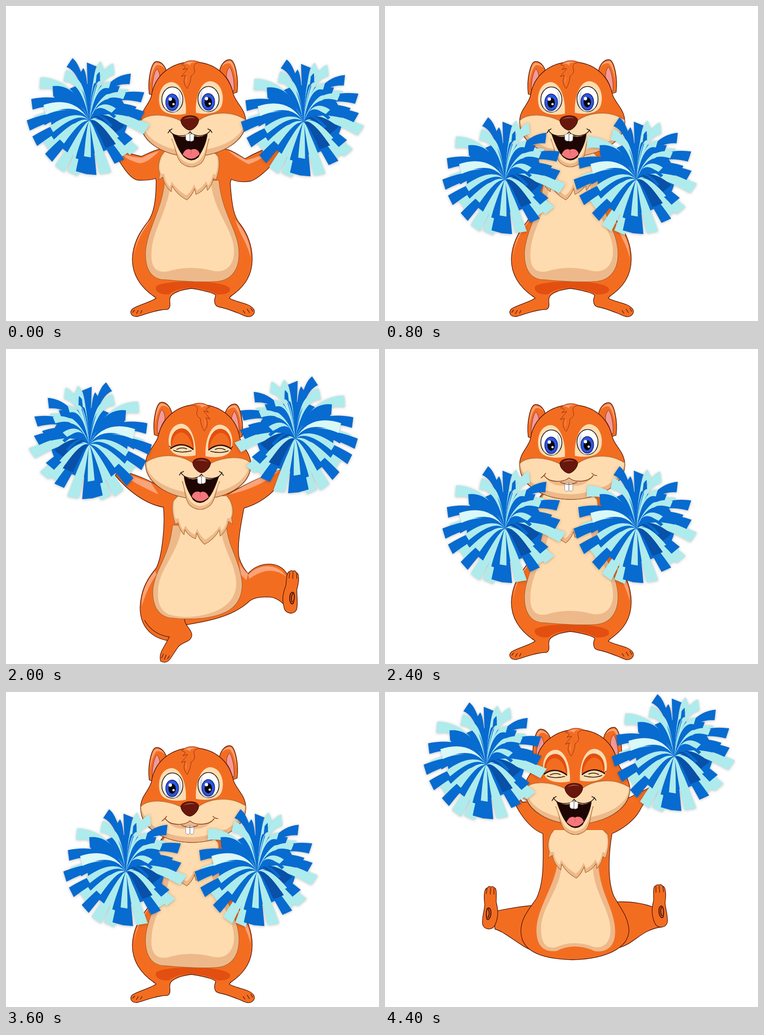
Write an HTML page that moves like this. It is 815 px wide and 687 px high and loops after 4.6 s.

```html
<!DOCTYPE html>
<html>
<head>
<meta charset="utf-8">
<title>Cheering chipmunk</title>
<style>
  html, body { margin: 0; width: 100%; height: 100%; overflow: hidden; background: #fff; }
  svg { display: block; width: 815px; height: 687px; }
  path, ellipse { stroke-linejoin: round; stroke-linecap: round; }
  .fur { fill: #f36d21; }
  .edge { stroke: #4c1507; stroke-width: 1.3; }
  .dark { fill: #e34f10; }
  .glow { fill: #fba478; }
  .cream { fill: #fedcaf; }
  .tan { fill: #eeb98a; }
  .soft { stroke: #a5642f; stroke-width: 1.2; }
  .line { fill: none; stroke: #4c1507; stroke-width: 1.3; }
  .lash { fill: none; stroke: #160805; stroke-width: 2.4; }
  .pom { filter: drop-shadow(0 1px 3px #0004); }
</style>
</head>
<body>
<svg viewBox="0 0 815 687">
  <defs>
    <g id="pom"></g>

    <g id="ear">
      <path class="fur edge" d="M313 192C309 162 317 121 329 121C341 121 350 134 352 148L324 196Z"/>
      <path class="glow" d="M315 170C315 150 320 125 329 124C336 124 344 129 347 136C340 130 333 127 328 130C321 138 317 155 315 170Z"/>
      <path d="M320 189C318 168 324 142 330 137C335 143 337 152 336 160Q327 172 324 188Z" fill="#f39a97" stroke="#8c2b16"/>
    </g>

    <g id="patch"><path class="cream" d="M338 222C329 203 336 167 362 166C384 167 395 204 393 235C375 239 346 238 338 222Z"/></g>
    <g id="eyeWhite">
      <ellipse cx="363.500" cy="204" rx="23" ry="27.500" fill="#fff" stroke="#1a0f0c" stroke-width="1.600"/>
      <path d="M376 184C387 198 388 224 369 231C357 232 349 227 346 221C368 230 381 212 376 184Z" fill="#d9dce3"/>
    </g>
    <g id="iris">
      <ellipse cx="363" cy="210" rx="14" ry="18" fill="#2f55e0" stroke="#101c60" stroke-width="1.300"/>
      <ellipse cx="363" cy="211" rx="8" ry="11" fill="#050509"/>
      <circle cx="359" cy="203" r="3.700" fill="#fff"/><circle cx="366" cy="214" r="2.500" fill="#fff"/>
    </g>
    <g id="lid">
      <path class="dark" d="M338 217C334 194 344 175 362 175C379 176 389 200 387 221Q361 204 338 217Z"/>
      <path class="fur" d="M340 214C340 196 348 184 361 184C374 186 383 204 384 216Q361 203 340 214Z"/>
      <path class="lash" d="M337 219Q361 202 386 221"/>
      <path class="lash" style="stroke-width:1.5" d="M343 223Q360 230 382 224M350 221Q361 215 372 220M339 218L334 214"/>
    </g>
    <g id="eyesOpen">
      <use href="#eyeWhite"/><use href="#eyeWhite" transform="matrix(-1 0 0 1 806 -1)"/>
      <use href="#iris"/><use href="#iris" x="79" y="-1"/>
    </g>
    <g id="eyesShut"><use href="#lid"/><use href="#lid" transform="matrix(-1 0 0 1 806 -1)"/></g>

    <g id="mouthOpen">
      <path class="tan soft" d="M362 290C371 306 370 330 384 343Q405 359 426 343C439 331 437 306 444 290Z"/>
      <path class="cream" d="M358 274C366 300 374 324 384 335Q405 352 424 335C436 322 440 300 446 274Z"/>
      <path d="M364 279Q388 292 402 279Q419 292 440 279C437 303 427 318 420 330Q405 343 389 329C377 316 371 298 364 279Z" fill="#1d0604" stroke="#3a0d06"/>
      <path d="M386 324C390 312 399 310 404 314C412 309 422 314 423 323Q406 343 386 324Z" fill="#f4777b"/>
      <path d="M404 315Q406 319 404 323" fill="none" stroke="#d4545a"/>
      <path class="lash" d="M357 270Q363 284 385 283Q398 282 402 274Q407 282 421 283Q441 282 447 270M354 277Q357 271 363 268M441 268Q448 271 450 276" style="stroke-width:1.6"/>
      <path d="M393 281Q401 276 402 280L402 294Q395 296 393 291ZM402 280Q409 277 411 282L410 293Q404 297 402 294Z" fill="#fff" stroke="#8b8580"/>
    </g>
    <g id="mouthShut">
      <path class="tan" d="M352 280C370 295 392 290 402 283C414 291 435 293 451 280C440 296 424 301 402 297C379 301 360 296 352 280Z"/>
      <path d="M393 292L402 291L402 308Q397 313 393 308ZM402 291L411 292L410 308Q406 313 402 308Z" fill="#fff" stroke="#8b8580"/>
      <path class="line" d="M341 281Q346 278 351 271M348 276C358 292 390 292 402 281C414 292 445 291 455 276M452 271Q457 276 463 276M384 291Q402 299 419 291" style="stroke:#8b3c1c;stroke-width:1.6"/>
    </g>

    <g id="head">
      <use href="#ear"/><use href="#ear" transform="matrix(-1 0 0 1 818 -4)"/>
      <path class="fur edge" d="M294 253C294 226 313 216 318 195C325 150 362 122 408 122C455 122 488 150 497 193C504 214 524 225 524 253C524 300 460 328 408 328C350 328 294 300 294 253Z"/>
      <path class="tan soft" d="M294 250C310 233 350 234 384 251Q402 262 420 250C445 231 490 226 524 248C526 300 460 328 408 328C350 328 294 300 294 250Z"/>
      <path class="cream" d="M296 250C312 235 350 236 384 253Q402 264 420 252C445 233 490 228 522 249C522 284 474 312 408 317C345 316 300 288 296 250Z"/>
      <use href="#patch"/><use href="#patch" transform="matrix(-1 0 0 1 808 -2)"/>
      <path class="fur" d="M384 128C394 117 411 117 424 123C414 124 409 127 411 136C415 145 409 150 404 153C404 163 401 171 396 180C387 170 388 161 392 151L383 154C390 145 394 141 397 136L386 139Q398 131 384 128Z" stroke="#8c2b16"/>
      <path class="glow" d="M389 126Q401 119 414 123Q400 123 403 130Q397 124 389 126ZM396 152Q392 164 396 172Q390 163 396 152Z"/>
      <path d="M382 250C383 236 420 235 421 249C421 260 408 271 402 271C394 271 382 260 382 250Z" fill="#68170c" stroke="#260502"/>
      <path d="M388 247Q401 238 414 245Q402 243 388 247Z" fill="#a4513f"/>
    </g>

    <g id="ruff">
      <path class="tan soft" d="M346 318L339 327Q329 350 336 365L334 379L343 373Q345 391 361 405L363 392Q374 412 395 423Q407 413 412 398L415 411Q431 404 438 391L440 402Q450 392 453 376L459 379Q469 350 464 328L454 318Z"/>
      <path class="cream" d="M347 318L341 328Q332 348 339 366L346 366Q347 382 358 395L362 383Q374 402 394 413Q405 405 411 389L417 402Q430 395 437 382L442 392Q449 382 452 366L458 368Q465 350 461 328L452 318Z"/>
    </g>
    <g id="sole">
      <path class="fur edge" d="M213 505C212 490 217 478 218 463C215 444 217 428 224 427Q227 422 231 425Q236 423 239 427C245 428 243 445 243 458C247 474 249 490 240 509C235 520 215 520 213 505Z"/>
      <path class="line" d="M223 429L221 440M231 427L230 441M238 429L238 441"/>
      <path class="line" d="M222 492C220 479 223 470 227 471C233 473 233 490 226 496Q222 497 222 492ZM226 474Q230 483 225 492" style="stroke-width:2.2"/>
    </g>
  </defs>
  <g id="scene"></g>
</svg>
<script>
const $ = id => document.getElementById(id);
const path = (cls, d) => `<path class="${cls}" d="${d}"/>`;
const use = (id, x = 0, y = 0, more = '') => `<use href="#${id}" x="${x}" y="${y}" ${more}/>`;

// Pompom: tapered ribbons that rise from the centre and bend outwards.
function ribbon([x, y], color, width) {
  const cx = x * .32, cy = y * .6 - 36;
  const len = Math.hypot(x - cx, y - cy);
  const nx = -(y - cy) / len * width / 2, ny = (x - cx) / len * width / 2;
  const f = v => v.toFixed(1);
  return `<path fill="${color}" d="M0 0Q${f(cx + nx * .6)} ${f(cy + ny * .6)} ${f(x + nx)} ${f(y + ny)}` +
    `L${f(x - nx + ny * .25)} ${f(y - ny - nx * .25)}Q${f(cx - nx * .6)} ${f(cy - ny * .6)} 0 0Z"/>`;
}
const BLUE = '#076bd0', AQUA = '#aeebec', NAVY = '#0850a8';
const aquaTips = [[28, -117], [52, -112], [80, -56], [124, 18], [97, 66], [35, 113], [-36, 114], [-64, 104],
  [-93, 54], [-116, 2], [-106, -82], [-52, -98], [78, 72]];
const blueTips = [[-42, -126], [5, -121], [88, -91], [115, -51], [114, -10], [85, 46], [65, 88], [4, 116],
  [-18, 112], [-88, 80], [-118, 44], [-132, 10], [-124, -36], [-78, -64], [-18, -104]];
const innerBlue = [[-15, -88], [22, -96], [62, -66], [64, -36], [97, -22], [-20, 84], [-55, 62], [-82, 32],
  [-100, 0], [-75, -50]];
const innerAqua = [[-82, 18], [-60, 44], [-30, -84], [14, -90], [44, -78], [76, -54], [52, -22], [20, 74], [-4, 78],
  [-36, 74], [58, 38]];
const ribbons = (tips, color, width) => tips.map(tip => ribbon(tip, color, width)).join('');
$('pom').innerHTML = `<ellipse rx="84" ry="76" cy="-4" fill="${BLUE}"/>` +
  ribbons(aquaTips, AQUA, 25) + ribbons(blueTips, BLUE, 23) +
  ribbons([[66, 18], [46, 54]], NAVY, 24) + ribbons(innerBlue, BLUE, 20) + ribbons(innerAqua, AQUA, 15) +
  ribbons([[-96, -24]], '#d9f8f8', 22) + ribbons([[56, -8], [48, 12]], BLUE, 7);

const hips = 'C494 445 500 462 512 476C530 500 538 525 538 552C538 585 524 611 490 634C450 604 370 604 324 634C292 612 276 585 276 552C277 520 290 497 305 477C318 462 328 440 328 382Z';
const standFeet = 'M322 632L328 637C318 645 290 652 277 660C268 668 274 679 288 677C305 672 335 661 352 662C362 658 357 647 358 641C357 630 372 620 405 616C440 621 461 629 458 632C453 645 456 656 468 657C485 660 510 671 525 677C538 680 547 669 541 661C532 647 500 646 488 637L492 632';
const stand = {
  head: [0, 0], ruff: [0, 0],
  feet: standFeet, feetTop: 'L498 602 314 602Z',
  feetExtra: path('line', 'M281 663L277 668M289 664L285 671M297 664L294 670M518 664L522 670M527 661L532 669M535 659L539 666'),
  belly: path('dark', 'M328 611C350 597 465 596 488 614C495 625 478 630 462 629Q430 614 400 615Q370 617 356 629C335 630 324 622 328 611Z') +
    path('glow', 'M310 476C293 498 281 525 280 552C281 520 291 492 316 466ZM507 474C526 499 536 525 534 548C527 515 510 498 501 466Z') +
    path('tan soft', 'M346 385C342 440 308 490 305 535C303 578 321 598 350 597Q410 603 455 601C492 601 510 575 509 538C508 488 472 455 465 380Z') +
    path('cream', 'M359 390C354 446 319 492 318 536C315 575 333 582 353 579Q400 564 450 577C482 585 500 562 498 532C496 486 458 455 448 390Z')
};
const poses = {
  out: { ...stand,
    trunk: 'M328 382L327 376C315 381 300 380 290 380C272 380 252 348 228 305Q260 320 295 328C320 318 340 303 370 316L455 316C475 303 498 318 522 333Q560 312 592 303L610 318C585 342 555 376 535 382Q510 386 492 378L490 386' + hips,
    shine: 'M240 313Q270 331 298 331Q318 320 335 316Q310 342 292 343Q262 336 240 313ZM525 336Q555 330 588 310Q560 335 530 345Q500 330 485 315Q505 323 525 336Z' },
  front: { ...stand, trunk: 'M328 382C328 350 332 322 350 310L462 310C484 320 492 350 490 386' + hips },
  kick: {
    head: [2, -15], ruff: [2, -11],
    trunk: 'M216 252C230 285 265 320 311 333C318 370 326 410 322 440Q315 462 302 476C280 448 225 445 213 486L222 545Q240 526 260 527Q285 526 298 535C335 570 390 580 441 588L478 622C515 615 538 590 538 550C537 515 525 490 503 464C490 440 483 370 487 331C525 325 565 295 592 262L586 250Q550 258 515 275L465 302L345 302Q280 265 224 247Z',
    shine: 'M232 250Q280 265 345 304Q285 290 250 264ZM514 278Q555 262 586 254Q550 280 498 303ZM302 479C282 456 240 450 219 482Q255 455 299 487ZM302 476Q318 463 322 448L318 478 306 490ZM505 470C527 495 536 525 534 546Q522 505 502 478Z',
    feet: 'M441 587C442 603 424 612 425 625C427 640 446 638 455 650L471 674Q480 688 493 681Q497 668 488 653L474 628C500 624 516 612 528 592',
    feetTop: 'L520 570 440 570Z',
    feetExtra: path('line', 'M474 669L478 676M481 667L485 677M487 665L491 674'),
    behind: use('sole', -22, 46, 'transform="rotate(-7 202 515)"'),
    belly: path('tan soft', 'M349 375C346 415 317 455 315 500C316 550 350 566 400 573Q440 577 475 572C502 566 512 540 510 510C505 465 474 440 467 370Z') +
      path('cream', 'M361 380C357 425 328 455 328 500C331 542 365 560 410 568Q445 574 475 565C498 555 501 530 498 505C494 465 456 430 448 380Z')
  },
  sit: {
    head: [11, -40], ruff: [23, -17],
    trunk: 'M272 203C277 245 310 295 345 309C346 365 348 415 331 450C313 476 296 495 297 523C298 560 330 582 410 584C490 582 532 555 533 520C532 490 513 470 500 445C485 410 489 350 496 309C525 296 550 275 560 252L592 202L530 232 300 240Z',
    shine: 'M279 204Q294 233 320 246L310 230ZM582 207Q560 232 527 244Q555 235 582 207Z',
    legs: 'M345 465C305 465 270 472 238 479L240 517C265 524 295 555 325 565L510 558C545 550 558 518 607 512L588 470Q550 455 500 458Z',
    behind: use('sole', 0, 0) + use('sole', 0, 0, 'transform="matrix(-1 0 0 1 830 -4)"'),
    belly: path('tan', 'M376 375C372 420 333 470 331 516C330 553 346 568 375 565Q413 545 458 565C490 570 507 548 502 510C497 465 468 435 466 370Z') +
      path('cream', 'M386 380C382 430 342 470 341 514C340 550 354 560 372 557Q413 539 456 556C482 561 496 540 492 510C488 470 456 435 454 380Z')
  }
};

const cheer = { pose: 'out', poms: [182, 250, 650, 253], open: true };
const front = (y = 392, open = false) => ({ pose: 'front', poms: [262, y, 549, y], open });
const together = drop => ({ pose: 'front', poms: [323, 392, 483, 392], drop });
const kick = (drop, shut, flip) => ({ pose: 'kick', poms: [199, 182 + drop, 649, 195 + drop], open: true, drop, shut, flip });
const sit = drop => ({ pose: 'sit', poms: [221, 159 + drop, 632, 141 + drop], open: true, drop, shut: true });

const STEP = 200;
const steps = [
  cheer, sit(13), sit(12), cheer,
  front(379, true), front(379), front(), together(13), together(0),
  kick(14, false, true), kick(14, true, true), kick(14, true, true),
  front(), together(13), together(0),
  kick(0), kick(14), kick(14, true),
  front(), together(0), together(13), sit(39), sit(0)
];

function draw({ pose, poms, open, drop = 0, shut, flip }) {
  const p = poses[pose];
  const [hx, hy] = p.head, [rx, ry] = p.ruff;
  const lowered = content => `<g transform="translate(0 ${drop})">${content}</g>`;
  const feet = p.feet ? path('fur', p.feet + p.feetTop) + path('line', p.feet) + p.feetExtra : '';
  const scene = $('scene');
  scene.setAttribute('transform', flip ? 'matrix(-1 0 0 1 831 0)' : '');
  scene.innerHTML =
    lowered((p.legs ? path('fur edge', p.legs) : '') + path('fur edge', p.trunk) +
      (p.shine ? path('glow', p.shine) : '')) +
    feet +
    lowered((p.behind || '') + p.belly + use('ruff', rx, ry) + use('head', hx, hy) +
      use(open ? 'mouthOpen' : 'mouthShut', hx, hy) + use(shut ? 'eyesShut' : 'eyesOpen', hx, hy)) +
    use('pom', poms[0], poms[1], 'class="pom"') + use('pom', poms[2], poms[3], 'class="pom"');
}

let shown = -1;
function tick() {
  const index = Math.floor(performance.now() / STEP) % steps.length;
  if (index !== shown) draw(steps[shown = index]);
  requestAnimationFrame(tick);
}
tick();
</script>
</body>
</html>
```
